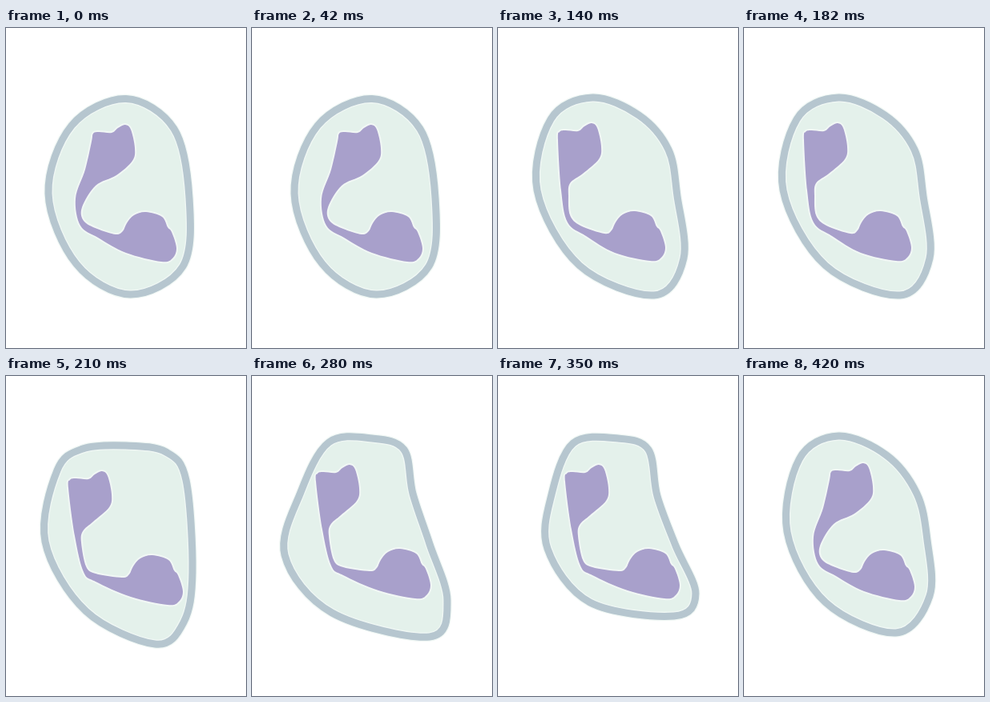
An HTML page that plays this animation: 300x400 px, repeating every 490 ms.

```html
<!DOCTYPE html>
<html lang="en">
<head>
<meta charset="utf-8">
<title>Crawling cell</title>
<style>
  html, body { margin: 0; width: 100%; height: 100%; overflow: hidden; background: #fff; }
  svg { display: block; width: 300px; height: 400px; }
  .pose {
    visibility: hidden;
    animation: show 490ms step-end calc((var(--i) - 7) * 70ms) infinite;
  }
  @keyframes show {
    0% { visibility: visible; }
    14.2857%, 100% { visibility: hidden; }
  }
  .rim { fill: #e4f1eb; stroke: #f1f8f5; stroke-width: 11.5; }
  .wall { fill: none; stroke: #b6c6cf; stroke-width: 9; }
  .nucleus { fill: #a8a0cb; stroke: #f1f7f5; stroke-width: 4; stroke-linejoin: round; paint-order: stroke; }
</style>
</head>
<body>
<svg id="stage" viewBox="0 0 300 400"></svg>
<script>
  const points = text => text.split(' ').map(pair => pair.split(',').map(Number));
  const shift = (list, dx, dy) => list.map(([x, y]) => [x + dx, y + dy]);

  // Smooth closed curve through all points (Catmull-Rom as Bezier)
  function loop(list) {
    const at = i => list[(i + list.length) % list.length];
    const handle = (i, side) =>
      at(i).map((v, k) => (v + side * (at(i + 1)[k] - at(i - 1)[k]) / 6).toFixed(2));
    return `M${at(0)}` + list.map((_, i) =>
      `C${handle(i, 1)} ${handle(i + 1, -1)} ${at(i + 1)}`).join('') + 'Z';
  }

  const upperLobe = points('107,142 109,132 116,130 132,131 140,125 149,121 156,127 161,150 158,166 138,184');
  const lowerLobe = points('137,258 146,254 151,244 160,234 175,230 195,236 202,249 207,255 213,275 208,288 194,292');

  // Two rigid lobes joined by the inner and outer edge of the neck
  const nucleus = (upper, inner, lower, outer) => loop([
    ...shift(upperLobe, ...upper), ...points(inner),
    ...shift(lowerLobe, ...lower), ...points(outer)
  ]);

  const bent = nucleus([0, 0], '112,197 95,224 97,241 114,251',
    [0, 0], '150,281 115,262 93,247 87,213 99,177');
  const straight = nucleus([-30, -2], '92,194 90,210 92,234 105,247',
    [-2, -1], '148,281 112,260 89,243 81,203');
  const open = nucleus([-29, -2], '96,194 94,208 100,238 112,247',
    [8, -6], '156,276 112,257 97,245 86,200');

  let html = '';
  let count = 0;

  function pose(outline, core, x = 0, y = 0) {
    const wall = loop(points(outline));
    html += `<g class="pose" style="--i:${count++}">
      <path class="rim" d="${wall}"/>
      <path class="wall" d="${wall}"/>
      <path class="nucleus" d="${core}" transform="translate(${x} ${y})"/>
    </g>`;
  }

  pose('150,88.5 210,126 229,212 221,298 155,333 88,295 53,207 82,122', bent);
  pose('118,87 180,111 218,160 227.5,225 214,305 152,332.5 85,291 52,203 66,117', straight);
  pose('118,87 176,109 213,152 224,210 232,288 195,334 102,297 49,203 66,114', straight, -2);
  pose('150,87 200,95 225,130 233,245 222,308 186,335 100,294 49,207 64,118 96,91', open);
  pose('150,78 190,92 201,147 222,210 244,280 222,326 100,296 41,224 61,145 96,83', open, 2, -8);
  pose('150,78 188,92 199,150 222,212 247,272 220,300 115,283 62,216 67,148 94,84', open, 6, -8);
  pose('118,75 178,99 216,147 229,205 232,275 190,321 102,283 54,195 69,104', bent, 0, -12);

  document.getElementById('stage').innerHTML = html;
</script>
</body>
</html>
```
